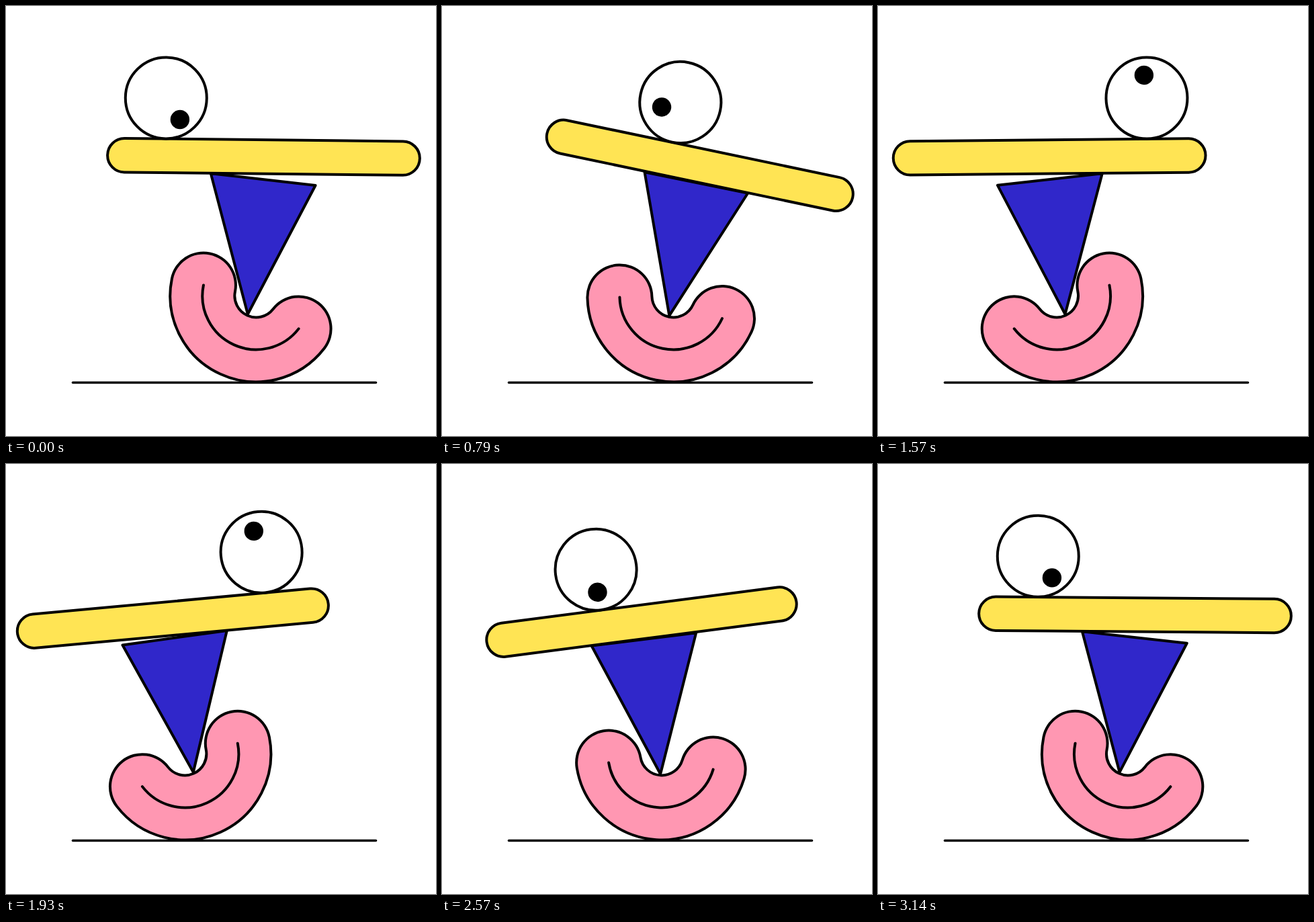
These frames come from a looping animation (640 px wide and 640 px high, 3.21 s). An HTML page:

```html
<!DOCTYPE html>
<html lang="en">
<head>
<meta charset="utf-8">
<title>Balancing act</title>
<style>
  html, body { margin: 0; width: 100%; height: 100%; overflow: hidden; background: #fff; }
  svg { display: block; width: 100vw; height: 100vh; }
  .line { fill: none; stroke: #000; stroke-width: 4; stroke-linecap: round; stroke-linejoin: round; }
  .ground { stroke-width: 3.6; }
  .rim { stroke-width: 100; }
  .flesh { stroke: #ff97b2; stroke-width: 92; }
  .blue { fill: #3027ca; }
  .yellow { fill: #ffe454; }
  .white { fill: #fff; }
</style>
</head>
<body>
<svg viewBox="0 0 640 640">
  <defs>
    <path id="curve" d="M-77.9 18.1A80 80 0 0 0 77.9 18.1"/>
  </defs>
  <path class="line ground" d="M99.5 560.5H550.5"/>
  <g id="rocker">
    <use href="#curve" class="line rim"/>
    <use href="#curve" class="line flesh"/>
    <use href="#curve" class="line"/>
    <g id="wedge">
      <path class="line blue" d="M0 0L-78.4 -202H78.4Z"/>
      <g id="plank">
        <rect class="line yellow" x="-232.4" y="-50.8" width="464.8" height="50.4" rx="25.2"/>
        <g id="ball">
          <circle class="line white" r="60.5"/>
          <circle id="pupil" r="14.2"/>
        </g>
      </g>
    </g>
  </g>
</svg>
<script>
const LOOP = 3210, STEPS = 45;
const parts = {};
for (const id of ['rocker', 'wedge', 'plank', 'ball', 'pupil']) parts[id] = document.getElementById(id);

const power = n => x => x < 0.5 ? (2 * x) ** n / 2 : 1 - (2 - 2 * x) ** n / 2;
const quad = power(2), cubic = power(3);

// Symmetric cubic bezier (k, 0, 1 - k, 1), solved by bisection
const bezier = k => x => {
  let lo = 0, hi = 1, t = 0.5;
  for (let i = 0; i < 24; i++) {
    t = (lo + hi) / 2;
    const u = 1 - t;
    if (3 * u * u * t * k + 3 * u * t * t * (1 - k) + t ** 3 < x) lo = t; else hi = t;
  }
  return t * t * (3 - 2 * t);
};
const steep = bezier(0.72);

// Goes 0 to 1 and back; half and delay are counted in steps
function there(step, ease, half, delay) {
  const x = ((step - delay) / half + 2) % 2;
  return x <= 1 ? ease(x) : 1 - ease(x - 1);
}
const swing = p => 1 - 2 * p;

function pose(step) {
  const rock = swing(there(step, cubic, 22.28, 2));
  const turn = there(step, cubic, 22.1, 0);
  const lean = -18.1 * swing(turn);
  const tilt = -24 * swing(there(step, quad, 22.1, -0.08)) - lean;
  const roll = -146.4 * swing(there(step, steep, 22.5, 0.86));
  const look = (66.8 + 185.4 * turn) * Math.PI / 180;
  const corner = 78.4 * Math.sign(tilt);

  const set = (id, value) => parts[id].setAttribute('transform', value);
  set('rocker', `translate(${319.1 + 53.5 * rock} 431.5) rotate(${24.75 * rock})`);
  set('wedge', `translate(0 30) rotate(${lean})`);
  set('plank', `translate(0 -202) rotate(${tilt} ${corner} 0)`);
  set('ball', `translate(${roll} -111.6)`);
  set('pupil', `translate(${7 + 35.3 * Math.cos(look)} ${35.3 * Math.sin(look) - 0.5})`);
}

const start = performance.now();
function draw() {
  const time = (performance.now() - start) % LOOP;
  pose(Math.floor(time / LOOP * STEPS + 0.1) % STEPS);
  requestAnimationFrame(draw);
}
draw();
</script>
</body>
</html>
```
